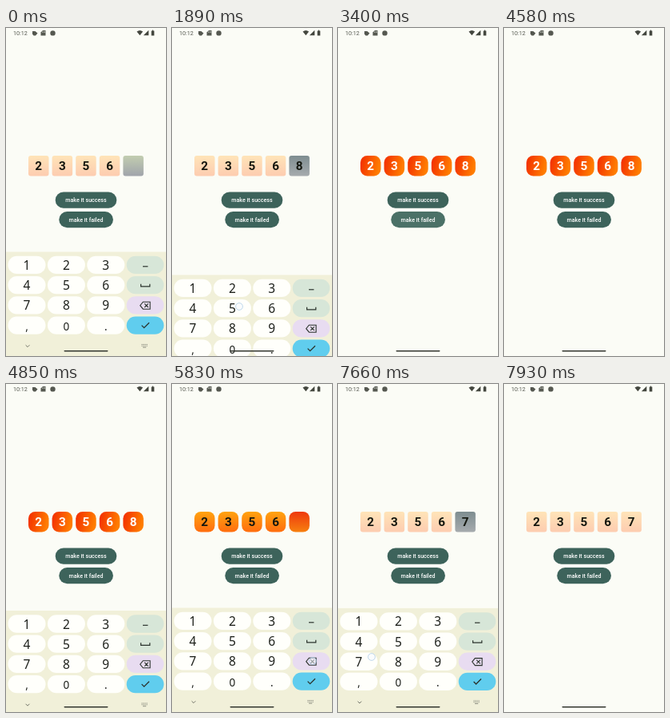
Animation of 200 by 411 pixels, one loop 8000 ms. Source, as an HTML page with a canvas:

```html
<!DOCTYPE html>
<html lang="en">
<head>
<meta charset="utf-8">
<title>Code input</title>
<style>
  html, body { margin: 0; width: 100%; height: 100%; overflow: hidden; background: #fbfcf6; }
  canvas { display: block; width: 200px; height: 411px; }
</style>
</head>
<body>
<canvas id="stage"></canvas>
<script>
const W = 200, H = 411, LOOP = 8000;
const canvas = document.getElementById('stage');
const ctx = canvas.getContext('2d');
const dpr = window.devicePixelRatio || 1;
canvas.width = W * dpr;
canvas.height = H * dpr;

const NORMAL = ['#ffe4b8', '#fdccb0'];
const EMPTY = ['#c2cdb0', '#a0a4ab'];
const ACTIVE = ['#7e8d90', '#a6abae'];
const ERROR = ['#f22b00', '#ff7d00'];
const WARM = ['#ff9d00', '#ff6400'];
const PAGE = '#fbfcf6', INK = '#14170f', BUTTON = '#3d635b';

// start, x, y, duration
const TAPS = [
  [1620, 84, 349, 300], [2750, 100, 240, 200], [4370, 160, 176, 160],
  [5720, 176, 347, 170], [7500, 42, 342, 280]
];

const ramp = (t, a, b) => Math.min(1, Math.max(0, (t - a) / (b - a)));
const lerp = (a, b, k) => a + (b - a) * k;
const easeOut = k => 1 - (1 - k) ** 3;
const rgb = hex => [1, 3, 5].map(i => parseInt(hex.slice(i, i + 2), 16));

function mix(a, b, k) {
  const to = rgb(b);
  return `rgb(${rgb(a).map((v, i) => Math.round(lerp(v, to[i], k)))})`;
}

function pill(x, y, w, h, r, fill) {
  ctx.fillStyle = fill;
  ctx.beginPath();
  ctx.roundRect(x, y, w, h, r);
  ctx.fill();
}

function text(s, x, y, size, weight, color, { align = 'center', font = 'Roboto' } = {}) {
  ctx.font = `${weight} ${size}px ${font}, sans-serif`;
  ctx.textAlign = align;
  ctx.fillStyle = color;
  ctx.fillText(s, x, y);
}

function line(d, color, width = 1.2) {
  ctx.strokeStyle = color;
  ctx.lineWidth = width;
  ctx.stroke(new Path2D(d));
}

function shape(d, color) {
  ctx.fillStyle = color;
  ctx.fill(new Path2D(d));
}

function statusBar() {
  const c = '#555850';
  text('10:12', 9, 9, 7.2, 400, c, { align: 'left' });
  shape('M33 4h3.5l3 2.6-2.5 2.8h-2.5l-1.5-2z', c);
  shape('M46 3h3.5v6.5h-6V5.5z', c);
  line('M45.6 4.5v1.5M47 4v2M48.4 4v2', PAGE, 0.5);
  pill(55.3, 3.2, 6.4, 6.4, 3.2, c);
  shape('M163.5 4.4q3.8-3 7.6 0L167.3 9.3z', '#44473f');
  shape('M178.3 2.8V9.3H171.8z', '#44473f');
  shape('M183 2.6h1v.8h1.3v6h-3.6v-6h1.3z', '#44473f');
}

function cellStyle(i, t) {
  const last = i === 4;
  let from = NORMAL, to = NORMAL, k = 0, radius = 3, error = false;
  if (t >= 2850 && t < 5770) {
    k = easeOut(ramp(t, 2850, 3150));
    to = ERROR;
    radius = lerp(3, 8.5, k);
    error = true;
  } else if (t >= 5770 && t < 7600) {
    k = ramp(t, 5800, 6080) ** 1.1;
    from = last ? ERROR : WARM;
    to = last ? EMPTY : NORMAL;
    radius = lerp(8.5, 3, k);
  } else if (last && t < 1720) {
    from = EMPTY;
  } else if (last) {
    const start = t < 2850 ? 1720 : 7600;
    const fade = ramp(t, start + 175, start + 315);
    from = fade ? ACTIVE : EMPTY;
    to = fade ? NORMAL : ACTIVE;
    k = fade || ramp(t, start, start + 50);
  }
  return { colors: from.map((c, j) => mix(c, to[j], k)), radius, error };
}

function cells(t) {
  const u = ramp(t, 2900, 3370);
  const shake = -4 * Math.sin(u * Math.PI * 6) * (1 - u * 0.5);
  const lastDigit = t < 1720 ? '' : t < 5770 ? '8' : t < 7600 ? '' : '7';
  ['2', '3', '5', '6', lastDigit].forEach((digit, i) => {
    const x = 28 + i * 29.6 + shake, y = 160, size = 25.5;
    const { colors, radius, error } = cellStyle(i, t);
    const fill = error
      ? ctx.createLinearGradient(x, y, x + size, y + 6)
      : ctx.createLinearGradient(0, y, 0, y + size);
    colors.forEach((c, j) => fill.addColorStop(j, c));
    pill(x, y, size, size, radius, fill);
    text(digit, x + size / 2, 178.3, 15.3, 700, error ? '#fff' : INK);
  });
}

function buttons(t) {
  const press = ramp(t, 2750, 2850) * (1 - ramp(t, 3300, 3670));
  pill(61.7, 205.5, 76.6, 20.3, 10.1, BUTTON);
  pill(66.3, 230, 67.6, 20.3, 10.1, mix(BUTTON, '#50766c', press));
  text('make it success', 100, 218.1, 7.1, 500, '#fff');
  text('make it failed', 100, 242.6, 7.1, 500, '#fff');
}

function keyboard(drop) {
  if (drop >= 131) return;
  ctx.save();
  ctx.translate(0, drop);
  ctx.fillStyle = '#f1f0d9';
  ctx.fillRect(0, 280.5, W, 140);
  const side = ['#d7e6d8', '#d7e6d8', '#e8dcf1', '#60cdee'];
  ['123', '456', '789', ',0.'].forEach((row, r) => {
    const y = 285.8 + r * 25.2;
    [...row].forEach((key, c) => {
      const x = 2.5 + c * 49.4;
      pill(x, y, 47, 22.3, 11.1, '#fffffb');
      text(key, x + 23.5, y + 17.2, r < 3 ? 15.5 : 13.5, 400, '#1e211c', { font: '"Noto Sans"' });
    });
    pill(150.7, y, 46.6, 22.3, 11.1, side[r]);
  });
  const ink = '#2b332d';
  line('M171 298.8h6.4', ink);
  line('M168.6 320.8v3h11.2v-3', ink);
  line('M171.3 343.2h8.8v9h-8.8l-3.6-4.5zM173.2 345.4l4.6 4.6M177.8 345.4l-4.6 4.6', ink, 1.1);
  line('M169.6 372.6l3 3 6.4-6.4', ink, 1.3);
  line('M24.6 397.3l2.4 2.4 2.4-2.4', '#74766a', 1);
  ctx.setLineDash([1, 0.7]);
  line('M169.4 396.5h7.5M169.4 398.3h7.5', '#85877a', 1);
  ctx.setLineDash([]);
  line('M171 400.2h4.2', '#85877a', 0.9);
  ctx.restore();
}

function keyboardDrop(t) {
  if (t < 4500) return 131 * ramp(t, 1755, 2042) ** 2;
  if (t < 7000) return 131 * (1 - easeOut(ramp(t, 4593, 4960)));
  return 131 * ramp(t, 7645, 7925) ** 2;
}

function taps(t) {
  for (const [start, x, y, length] of TAPS) {
    if (t < start || t >= start + length) continue;
    ctx.beginPath();
    ctx.arc(x, y, 4.4, 0, 7);
    ctx.fillStyle = 'rgba(245,250,255,.55)';
    ctx.fill();
    ctx.strokeStyle = 'rgba(150,190,225,.65)';
    ctx.lineWidth = 0.9;
    ctx.stroke();
  }
}

function draw(now) {
  const t = now % LOOP;
  ctx.setTransform(dpr, 0, 0, dpr, 0, 0);
  ctx.fillStyle = PAGE;
  ctx.fillRect(0, 0, W, H);
  statusBar();
  cells(t);
  buttons(t);
  keyboard(keyboardDrop(t));
  pill(72.5, 403.9, 55, 1.7, 0.8, '#33362f');
  taps(t);
}

let begin;
function tick(now) {
  begin ??= now;
  draw(now - begin);
  requestAnimationFrame(tick);
}
requestAnimationFrame(tick);
</script>
</body>
</html>
```
